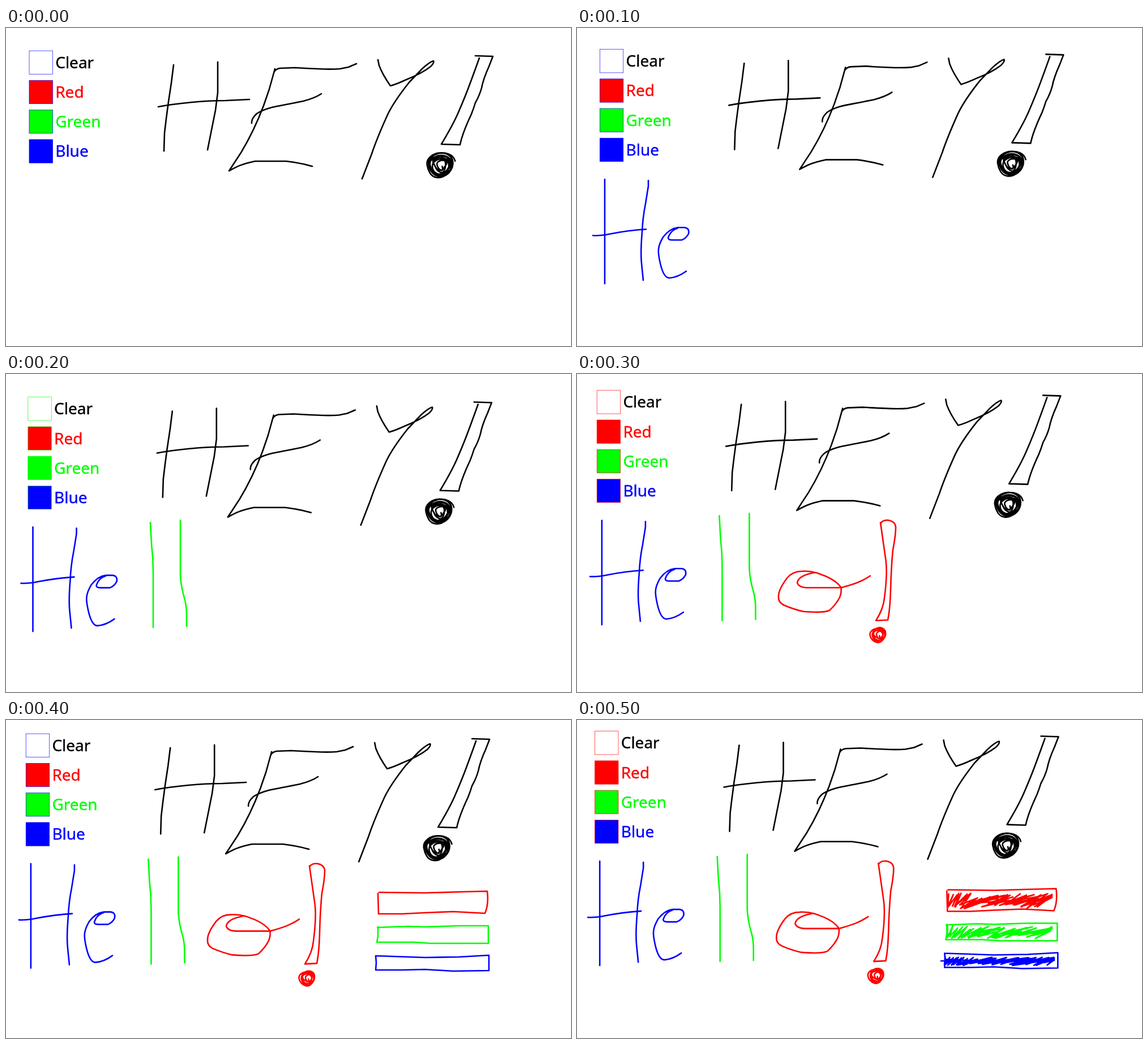
Animation, 998 px wide and 561 px high, one loop 600 ms. Source, as an HTML page:

```html
<!DOCTYPE html>
<html lang="en">
<head>
<meta charset="utf-8">
<title>Sketch board</title>
<style>
  html, body { margin: 0; width: 100%; height: 100%; overflow: hidden; background: #fff; }
  svg { display: block; width: 998px; height: 561px; }
  text { font: 28px "Noto Sans", "Open Sans", sans-serif; stroke-width: 0.4; }
  path { fill: none; stroke-width: 2.6; stroke-linecap: round; stroke-linejoin: round; }
</style>
</head>
<body>
<svg viewBox="0 0 998 561"><g id="board"></g></svg>
<script>
const NS = "http://www.w3.org/2000/svg";
const RED = "#f00", GREEN = "#0f0", BLUE = "#00f", BLACK = "#000";
const STEP = 100;

// Board offset and swatch outline colour at each step
const steps = [
  { x: 0, y: 0, pen: BLUE },
  { x: -0.7, y: -2.6, pen: BLUE },
  { x: -2.2, y: 0.5, pen: GREEN },
  { x: -5.8, y: -11.4, pen: RED },
  { x: -5.8, y: -16, pen: BLUE },
  { x: -9.5, y: -20.5, pen: RED }
];

const board = document.getElementById("board");

function add(parent, tag, attrs) {
  const el = document.createElementNS(NS, tag);
  for (const key in attrs) el.setAttribute(key, attrs[key]);
  parent.appendChild(el);
  return el;
}

// Each layer uses the coordinates of the step in which it is first drawn
function layer(step) {
  const { x, y } = steps[step];
  return add(board, "g", { transform: `translate(${-x} ${-y})` });
}

const pen = (parent, stroke, ...paths) =>
  paths.forEach(d => add(parent, "path", { d, stroke }));

function random(seed) {
  return () => (seed = (seed * 16807) % 2147483647) / 2147483647;
}

// Smooth path through the midpoints of a point list
function smooth(pts) {
  let d = `M${pts[0]}`;
  for (let i = 1; i < pts.length - 1; i++) {
    const [a, b] = pts[i], [c, e] = pts[i + 1];
    d += `Q${a} ${b} ${(a + c) / 2} ${(b + e) / 2}`;
  }
  return d;
}

// Round scribble: a slightly egg-shaped spiral whose centre wanders
function spiral(cx, cy, radius, turns, seed) {
  const rnd = random(seed), per = 9, pts = [];
  for (let i = 0; i <= turns * per; i++) {
    const k = i / (turns * per), a = i / per * 2 * Math.PI;
    const r = radius * (0.18 + 0.74 * Math.pow(k, 0.6) + 0.06 * Math.cos(3 * a + 1.7) + (rnd() - 0.5) * 0.12);
    const drift = radius * 0.1;
    pts.push([
      cx + Math.cos(a) * r + Math.sin(a * 0.37) * drift,
      cy + Math.sin(a) * r * 0.96 + Math.cos(a * 0.43) * drift
    ]);
  }
  return smooth(pts);
}

// Back-and-forth filling: steep at the left end, long and slanted after it
function hatch(x0, x1, top, bottom, count, slant, seed) {
  const rnd = random(seed), h = bottom - top;
  let d = "";
  for (let i = 0; i <= count; i++) {
    const k = i / count, x = x0 + (x1 - x0) * k;
    const lean = slant * Math.min(1, 0.12 + k * 2.5) * (0.5 + rnd() * 0.8);
    const inset = h * (0.12 + 0.3 * Math.min(1, k * 4));
    const low = bottom - inset * rnd(), high = top + inset * (0.3 + rnd());
    const left = Math.max(x0, x - lean), right = Math.min(x1, x + lean);
    d += `${i ? "L" : "M"}${left} ${low}L${right} ${high}`;
  }
  return d;
}

const swatches = [["Clear", "#fff", BLACK], ["Red", RED, RED], ["Green", GREEN, GREEN], ["Blue", BLUE, BLUE]]
  .map(([name, fill, ink], i) => {
    const y = 40.2 + i * 52.2;
    add(board, "text", { x: 87.2, y: y + 30.6, fill: ink, stroke: ink }).textContent = name;
    return add(board, "rect", { x: 41, y, width: 41.5, height: 41.3, fill, "stroke-width": 0.65 });
  });

pen(layer(0), BLACK,
  "M296 65L292 97L287 130L283 160L280 185L279 217",
  "M374 60L374 114L370 145L363 180L356 215",
  "M269 139C300 133 350 128 388 128L430 126",
  "M619 63L605 69L590 72C565 74 530 71 510 70L484 71Q477 72 474 77L475 72L465 108L455 137Q438 182 415 220L394 252C405 246 415 240 440 235L495 235Q520 238 541 244",
  "M434 168Q433 160 443 151C460 140 480 138 500 134L525 129Q545 124 557 116",
  "M657 56L659 66Q665 82 679 102Q690 99 705 92Q735 80 750 68Q757 61 755 58Q748 60 735 72L712 96Q685 130 674 153Q655 195 646 222L629 266",
  "M829 49L860 50L853 68Q843 90 840 106Q836 120 829 132Q826 142 822 152Q806 186 802 206L769 205Q790 170 799 149Q812 119 820 97Q830 70 836 53",
  spiral(767.5, 241.5, 27, 9, 71));

const hello = layer(1);
pen(hello, BLUE,
  "M49 267L49 451",
  "M126 269L126 279L121 310Q116 335 115 360Q112 395 114 415L117 445",
  "M28 366Q40 367 60 363Q90 357 122 355",
  "M178 353Q165 357 161 370Q161 374 168 374L185 374Q193 371 197 363Q199 353 190 352L178 352Q163 354 152 369Q145 381 144 390Q143 398 147 415Q153 441 163 441Q178 440 193 429");

const ells = layer(2);
pen(ells, GREEN,
  "M255 262L257 300Q260 325 260 350L260 447",
  "M308 258L308 355Q309 375 315 395Q319 408 319 425L319 445");

const ending = layer(3);
pen(ending, RED,
  "M518 356C500 368 487 371 467 377L405 377Q391 376 389 368Q391 358 408 353L420 350",
  "M424 351Q410 347 397 348Q381 348 371 360Q356 380 356 392Q355 403 366 408Q385 416 400 419Q435 422 446 417Q458 406 464 394Q468 384 466 376Q458 365 440 357L424 351",
  "M536 264Q540 257 550 258Q562 260 563 270Q563 285 558 310Q555 340 554 380Q553 415 549 434L528 435Q541 415 543 395Q549 350 545 325L536 262",
  spiral(532.5, 460, 16, 5, 23));

const bars = layer(4);
pen(bars, RED, "M657 306L658 342L700 342L740 340L790 338L846 341Q853 325 850 302L810 303L740 305L659 304");
pen(bars, GREEN, "M657 365L657 382L655 392L720 392L750 394L852 394L852 363L800 363L740 365L710 364L656 366");
pen(bars, BLUE, "M653 416L654 428L653 441L700 441L740 440L790 443L853 442L853 415L800 418L740 419L653 416");

const fills = layer(5);
pen(fills, RED, hatch(655, 839, 302, 333, 40, 24, 41));
pen(fills, GREEN, hatch(653, 839, 361, 386, 30, 25, 97));
pen(fills, BLUE, "M643 425L664 425L650 422L690 424L740 426L843 424", hatch(649, 843, 416, 433, 42, 22, 63));

const layers = [hello, ells, ending, bars, fills];

function render(time) {
  const now = Math.floor(time / STEP) % steps.length;
  const { x, y, pen: outline } = steps[now];
  board.setAttribute("transform", `translate(${x} ${y})`);
  swatches.forEach(s => s.setAttribute("stroke", outline));
  layers.forEach((g, i) => g.setAttribute("visibility", i < now ? "visible" : "hidden"));
}

const start = performance.now();
function tick() {
  render(performance.now() - start);
  requestAnimationFrame(tick);
}
tick();
</script>
</body>
</html>
```
